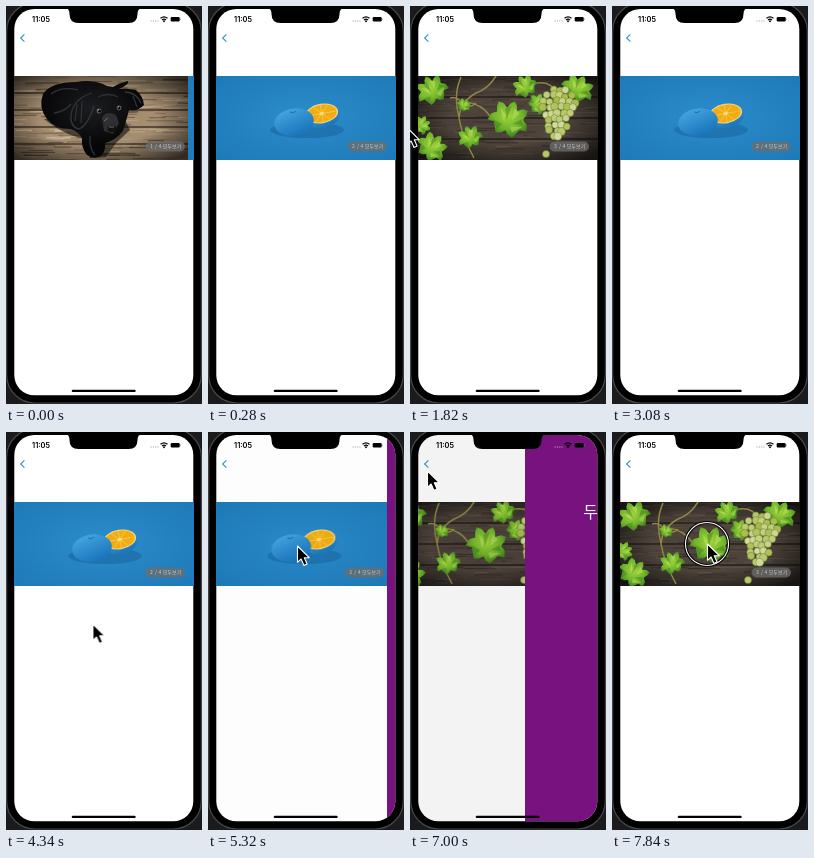
Write an HTML page that moves like this. It is 196 by 398 pixels and loops after 8000 ms.

```html
<!DOCTYPE html>
<html lang="ko">
<head>
<meta charset="utf-8">
<title>Carousel</title>
<style>
@property --push { syntax: '<number>'; inherits: true; initial-value: 180; }
html, body { margin: 0; width: 100%; height: 100%; overflow: hidden; background: #1b1b1d; }
#stage { display: block; width: 196px; height: 398px; animation: push 8s infinite linear; }
text { font-family: 'Noto Sans CJK KR', 'Noto Sans CJK', sans-serif; }
.time { font: 600 7.4px Inter, sans-serif; }
.badge text { font-size: 5.1px; fill: #c9c9c9; }
.title { font-size: 16px; font-weight: 500; fill: #fff; text-anchor: middle; }

.under { transform: translateX(calc((var(--push) - 180) * .3px)); }
.page { transform: translateX(calc(var(--push) * 1px)); }
.dim { opacity: calc((180 - var(--push)) / 180 * .12); }
.track { animation: track 8s infinite ease-out; }
.cursor { animation: move 8s infinite ease-in-out; }
.shown { animation: shown 8s infinite step-end; }
.ring { animation: ring 8s infinite step-end; }
.n1 { animation: first 8s infinite step-end; }
.n2 { animation: second 8s infinite step-end; }
.n3 { animation: third 8s infinite step-end; }

@keyframes push {
  0%, 65.5% { --push: 180; }
  66.5% { --push: 171; }
  67.3% { --push: 171; animation-timing-function: cubic-bezier(.25,.45,.2,1); }
  73.5%, 85.5% { --push: 0; }
  87.5% { --push: 107; }
  88.3% { --push: 107; animation-timing-function: cubic-bezier(.15,.65,.25,1); }
  95.4%, 100% { --push: 180; }
}
@keyframes track {
  0%, .87% { transform: translateX(-6px); }
  3.5%, 16.1% { transform: translateX(-180px); }
  17.5%, 18.3% { transform: translateX(-264px); }
  22%, 31.2% { transform: translateX(-360px); animation-timing-function: ease-in-out; }
  38.4%, 77% { transform: translateX(-180px); }
  77.1%, 100% { transform: translateX(-360px); }
}
@keyframes move {
  0%, 10.5% { transform: translate(139px,140px); }
  14%, 16.1% { transform: translate(139px,117px); }
  17.5%, 18.3% { transform: translate(29px,118px); }
  22.75% { transform: translate(-3px,122px); }
  26.1% { transform: translate(-16px,125px); }
  26.2%, 31.2% { transform: translate(25px,113px); }
  38.4% { transform: translate(188px,130px); }
  38.5%, 47.2% { transform: translate(178px,153px); }
  52% { transform: translate(56px,212px); }
  56.9%, 57.5% { transform: translate(126px,166px); }
  61%, 75% { transform: translate(89px,114px); }
  78.8%, 81% { transform: translate(26px,39px); }
  82%, 88.3% { transform: translate(17px,39px); }
  95%, 100% { transform: translate(95px,112px); }
}
@keyframes shown {
  0% { opacity: 0; }
  10.5% { opacity: 1; }
  26.1% { opacity: 0; }
  27.1% { opacity: 1; }
  38.4% { opacity: 0; }
  47.2%, 100% { opacity: 1; }
}
@keyframes ring {
  0% { opacity: 0; }
  16.1% { opacity: 1; }
  20% { opacity: 0; }
  31.4% { opacity: 1; }
  37% { opacity: 0; }
  61% { opacity: 1; }
  63% { opacity: 0; }
  81.8% { opacity: 1; }
  84% { opacity: 0; }
  97.9%, 100% { opacity: 1; }
}
@keyframes first { 0% { opacity: 1; } 2.2%, 100% { opacity: 0; } }
@keyframes second {
  0% { opacity: 0; }
  2.2% { opacity: 1; }
  18.3% { opacity: 0; }
  35% { opacity: 1; }
  77%, 100% { opacity: 0; }
}
@keyframes third {
  0% { opacity: 0; }
  18.3% { opacity: 1; }
  35% { opacity: 0; }
  77%, 100% { opacity: 1; }
}
</style>
</head>
<body>
<svg id="stage" viewBox="0 0 196 398">
  <defs>
    <clipPath id="screen"><rect x="8.3" y="3" width="179" height="386.3" rx="20"/></clipPath>
    <radialGradient id="vignette" r=".65">
      <stop offset=".5" stop-opacity="0"/><stop offset="1" stop-opacity=".7"/>
    </radialGradient>
    <radialGradient id="blue" r=".75">
      <stop offset="0" stop-color="#2c8ccb"/><stop offset="1" stop-color="#1d78b6"/>
    </radialGradient>
    <linearGradient id="peel" x2=".4" y2="1">
      <stop offset="0" stop-color="#49a9e4"/><stop offset="1" stop-color="#1c78bd"/>
    </linearGradient>
    <radialGradient id="coat" cx=".5" cy=".35">
      <stop offset="0" stop-color="#1c1d20"/><stop offset="1" stop-color="#060607"/>
    </radialGradient>
    <radialGradient id="green" cx=".45" cy=".45" r=".6">
      <stop offset="0" stop-color="#a3d53f"/><stop offset=".6" stop-color="#70b52b"/><stop offset="1" stop-color="#3d7a1e"/>
    </radialGradient>
    <g id="leaf">
      <path d="M0-11 2-9 3-6 6-8 9-8 9-5 8-2 11 0 12 4 8 4 7 6 5 10 2 9 0 7-2 9-5 10-7 6-8 4-12 4-11 0-8-2-9-5-9-8-6-8-3-6-2-9Z" fill="url(#green)"/>
      <path d="M1-7 5-5 2 0ZM-7-5-3-2-2 3ZM2 4 9 2 4 7Z" fill="#c8e86a" opacity=".45"/>
      <path d="M-4-5-1-8-1 1ZM3 2 7-2 9 1ZM-9 3-3 4-5 8Z" fill="#356f19" opacity=".4"/>
    </g>
  </defs>

  <rect width="196" height="398" fill="#1b1b1d"/>
  <rect x=".7" y="-3" width="194.6" height="400" rx="28" fill="#000" stroke="#48484b" stroke-width="1.2"/>

  <g clip-path="url(#screen)">
    <g class="under">
      <rect x="8" width="240" height="398" fill="#fff"/>
      <svg x="8" y="70" width="180" height="83.4" viewBox="8 70 180 83.4">
        <g class="track">
          <svg x="8" y="70" width="180" height="84" viewBox="2 70 180 84">
            <rect y="70" width="190" height="84" fill="#a58d70"/>
            <g id="planks"></g>
            <rect x="2" y="70" width="180" height="84" fill="url(#vignette)"/>
            <path d="M38 113Q60 130 76 132L84 152 100 151 110 137 124 124 118 112Z" opacity=".55"/>
            <path d="M101 80Q88 73 70 76 45 76 37 88 32 102 41 113 49 123 64 123 72 125 76 132 75 142 81 149 88 154 95 150 100 145 99 137 110 134 117 125 121 112 123 104 131 106 138 99 137 90 130 84 119 82 113 83 124 78 122 75 113 77 107 81Z" fill="url(#coat)"/>
            <path d="M86 87Q67 93 65 109 64 121 73 123 82 119 88 100M119 86Q130 86 135 97" fill="none" stroke="#34353a" stroke-width="1.3"/>
            <path d="M45 88Q56 80 72 84M48 107Q60 105 65 98M84 130Q83 142 89 149M71 98 69 115M76 95 75 117M127 90 131 101M92 91Q102 86 112 91" fill="none" stroke="#303136" stroke-width="1.3"/>
            <path d="M96 112Q100 104 110 109L113 117 107 128 98 125Z" fill="#3c3c3f" opacity=".7"/>
            <ellipse cx="106" cy="123" rx="4.5" ry="3.2" fill="#111"/>
            <path d="M103 121h5M98 115l4-3" stroke="#77777a" stroke-width=".9"/>
            <g fill="#756a59"><circle cx="93" cy="105" r="2.4"/><circle cx="113" cy="102" r="2.4"/></g>
            <g><circle cx="93.4" cy="105" r="1.5"/><circle cx="113" cy="102" r="1.5"/></g>
            <path d="M92 104h1M112 101h1" stroke="#ddd" stroke-width=".9"/>
          </svg>

          <svg x="188" y="70" width="180" height="84" viewBox="8 70 180 84">
            <rect x="8" y="70" width="180" height="84" fill="url(#blue)"/>
            <ellipse cx="99" cy="124" rx="37" ry="8" fill="#125990" opacity=".4"/>
            <g transform="rotate(-10 114 109)">
              <ellipse cx="114" cy="110" rx="18" ry="12" fill="url(#peel)"/>
              <ellipse cx="114" cy="107.5" rx="16.5" ry="9.8" fill="#f5d27a"/>
              <ellipse cx="114" cy="107.5" rx="15" ry="8.7" fill="#f0ac13"/>
              <path d="M100 107.5H128M107 100.5 121 114.5M121 100.5 107 114.5M114 99V116" stroke="#f9cb47" stroke-width=".8"/>
              <ellipse cx="114" cy="107.5" rx="2.5" ry="1.5" fill="#f8dc87"/>
            </g>
            <ellipse cx="86" cy="116" rx="20" ry="13.5" fill="url(#peel)" transform="rotate(-9 86 116)"/>
            <path d="M82 106q3 2 6-1" fill="none" stroke="#1e70ac"/>
          </svg>

          <svg x="368" y="70" width="180" height="84" viewBox="8 70 180 84">
            <rect x="8" y="70" width="180" height="84" fill="#4d433b"/>
            <g id="boards"></g>
            <rect x="8" y="70" width="180" height="84" fill="url(#vignette)"/>
            <path d="M86 70Q78 83 66 87 50 96 49 112 52 130 64 152M49 111Q43 89 51 71M56 96Q72 98 80 110M120 79Q138 72 147 86M40 92Q48 90 52 98 60 103 66 97" fill="none" stroke="#8f8645" stroke-width="1.5"/>
            <use href="#leaf" transform="translate(22 84) rotate(-25) scale(1.35)"/>
            <use href="#leaf" transform="translate(12 119) rotate(70) scale(.8)"/>
            <use href="#leaf" transform="translate(22 141) rotate(40) scale(1.3)"/>
            <use href="#leaf" transform="translate(60 131) rotate(-20) scale(1.05)"/>
            <use href="#leaf" transform="translate(54 99) rotate(30) scale(.6)"/>
            <use href="#leaf" transform="translate(99 113) rotate(18) scale(1.7)"/>
            <use href="#leaf" transform="translate(115 80) rotate(-30) scale(1.05)"/>
            <use href="#leaf" transform="translate(128 98) rotate(65) scale(.9)"/>
            <use href="#leaf" transform="translate(168 82) rotate(28) scale(1.4 1.2)"/>
            <g id="grapes" stroke="#6d7c35" stroke-width=".5"><circle cx="136" cy="148" r="3.5" fill="#b9c66c"/></g>
          </svg>
        </g>
      </svg>
      <g class="badge">
        <rect x="139.5" y="135.4" width="39.5" height="10.2" rx="5.1" fill="#6e6e6e" fill-opacity=".78"/>
        <text class="n1" x="144" y="142.3">1</text>
        <text class="n2" x="144" y="142.3">2</text>
        <text class="n3" x="144" y="142.3">3</text>
        <text x="149" y="142.3">/ 4 모두보기</text>
      </g>
    </g>
    <rect class="dim" x="8" width="180" height="398"/>
    <g class="page">
      <rect x="8" width="181" height="398" fill="#78127e"/>
      <text class="title" x="98" y="86">두번째 뷰</text>
    </g>
    <path d="M18.4 28.3 14.6 32 18.4 35.7" fill="none" stroke="#2b97bb" stroke-width="1.1"/>
    <rect x="65.7" y="383.8" width="64" height="2.3" rx="1.15"/>
  </g>

  <path d="M60 2Q63.5 3 63.5 8 63.5 17 72.5 17H122.5Q131.5 17 131.5 8 131.5 3 135.5 2Z"/>
  <text class="time" x="26" y="16">11:05</text>
  <path d="M144.5 15h8" stroke="#aaa" stroke-width="1.2" stroke-dasharray="1.2 1.1"/>
  <g fill="none" stroke="#000" stroke-width="1.2">
    <path d="M154.5 12.3q3.5-2.8 7 0M156 14q2-1.7 4 0"/>
    <circle cx="158" cy="15.3" r=".4"/>
  </g>
  <rect x="164.7" y="11" width="9" height="4.4" rx="1.2"/>
  <path d="M174.4 12.5v1.4" stroke="#777" stroke-width=".7"/>

  <g class="cursor"><g class="shown">
    <g class="ring" fill="none">
      <circle r="21.5" stroke="#000" stroke-width="3.2"/>
      <circle r="21.5" stroke="#fff" stroke-width="1.1"/>
    </g>
    <path d="M.5 0V16.3L4.1 13 7 19.4 10.1 18 7.3 11.7H12.2Z" stroke="#fff" stroke-width="1.1" stroke-linejoin="round"/>
  </g></g>
</svg>
<script>
let seed = 11;
const rand = () => (seed = seed * 16807 % 2147483647) / 2147483647;

function add(id, tag, attrs) {
  const el = document.createElementNS('http://www.w3.org/2000/svg', tag);
  for (const key in attrs) el.setAttribute(key, attrs[key]);
  document.getElementById(id).append(el);
}

function wood(id, light, dark, gap, strength) {
  for (let i = 0; i < 200; i++) {
    const x = rand() * 200 - 20, y = 70 + rand() * 84;
    add(id, 'path', {
      d: `M${x} ${y}q12 ${rand() * 2 - 1} ${10 + rand() * 30} 0`,
      fill: 'none', stroke: i % 2 ? light : dark,
      'stroke-width': .4 + rand(), opacity: strength * (.4 + rand() * .6)
    });
  }
  for (let y = 70 + gap; y < 154; y += gap)
    add(id, 'path', { d: `M0 ${y}H190`, stroke: dark, 'stroke-width': 1.3 });
}

wood('planks', '#dac7a8', '#45362a', 17, .75);
wood('boards', '#76685b', '#241e1a', 21, .5);

for (let row = 0; row < 9; row++) {
  const count = [3, 5, 6, 6, 5, 4, 4, 3, 2][row];
  for (let i = 0; i < count; i++)
    add('grapes', 'circle', {
      cx: 150 - row * .5 + (i - (count - 1) / 2) * 6.1 + rand() * 3 - 1.5,
      cy: 84 + row * 5.9 + rand() * 3 - 1.5,
      r: 3.2 + rand() * .8, fill: `hsl(${66 + rand() * 8} 46% ${50 + rand() * 24}%)`
    });
}
</script>
</body>
</html>
```
